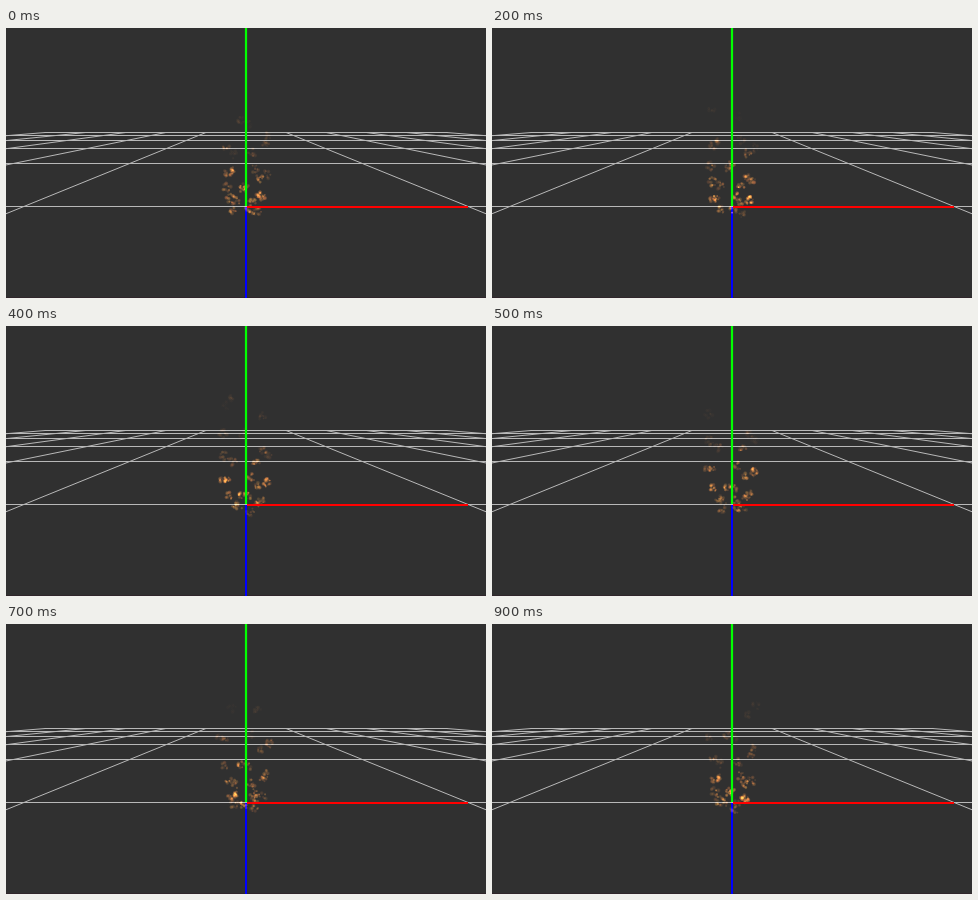
An HTML page with a canvas for the animation above (1 s loop, 480 by 270 pixels).

```html
<!DOCTYPE html>
<html lang="en">
<head>
<meta charset="utf-8">
<title>Fire particles</title>
<style>
html, body { margin: 0; width: 100%; height: 100%; overflow: hidden; background: #303030; }
canvas { display: block; width: 480px; height: 270px; }
</style>
</head>
<body>
<canvas id="stage" width="480" height="270"></canvas>
<script>
const ctx = document.getElementById('stage').getContext('2d');
const W = 480, H = 270, CX = 240;
const LOOP = 1, STEP = 0.1;
const HORIZON = 88.2, SPREAD = 2.46;
const COUNT = 27, FLOOR = 210;

function random(seed) {
  return () => {
    seed = (seed + 0x6D2B79F5) | 0;
    let n = Math.imul(seed ^ (seed >>> 15), 1 | seed);
    n = (n + Math.imul(n ^ (n >>> 7), 61 | n)) ^ n;
    return ((n ^ (n >>> 14)) >>> 0) / 4294967296;
  };
}

const rnd = random(11);
const between = (a, b) => a + (b - a) * rnd();

// Particles leave a ring in turn; its near side starts lower on the stage.
const particles = Array.from({ length: COUNT }, (_, i) => {
  const angle = i * 2.4;
  return {
    birth: i / COUNT * LOOP,
    side: Math.cos(angle) * between(22, 31),
    base: 26.5 + Math.sin(angle) * 4,
    life: between(0.78, 1),
    spin: between(-2.5, 2.5),
    glow: between(0.3, 0.6),
    puffs: Array.from({ length: 9 }, () => ({
      angle: between(0, Math.PI * 2),
      dist: 4.3 * Math.sqrt(rnd()),
      size: between(1.2, 2.6),
      heat: rnd()
    }))
  };
});

const rise = (base, age) => FLOOR - base * Math.exp(1.75 * age);
const drift = age => 1 - 0.62 * Math.exp(-2.8 * age);

function rect(color, x, y, w, h) {
  ctx.fillStyle = color;
  ctx.fillRect(x, y, w, h);
}

function line(x1, y1, x2, y2) {
  ctx.beginPath();
  ctx.moveTo(x1, y1);
  ctx.lineTo(x2, y2);
  ctx.stroke();
}

function drawGrid() {
  ctx.strokeStyle = '#b8b8b8';
  ctx.lineWidth = 1;
  for (let row = 0; row < 6; row++) {
    const depth = 1 / (0.01107 + 0.01 * row);
    const half = Math.min(CX, 5 * SPREAD * depth);
    const y = Math.floor(HORIZON + depth) + 0.5;
    line(CX - half, y, CX + half, y);
  }
  for (let col = 1; col <= 5; col++) {
    const top = 40 * col;
    const yAt = dx => HORIZON + dx / (SPREAD * col);
    for (const dir of [-1, 1]) {
      line(CX + dir * top, yAt(top), CX + dir * CX, yAt(CX));
    }
  }
}

function drawPuff(x, y, r, heat, alpha) {
  const tone = `${200 + 45 * heat | 0},${88 + 72 * heat | 0},${28 + 12 * heat | 0}`;
  const g = ctx.createRadialGradient(x, y, 0, x, y, r);
  g.addColorStop(0, `rgba(${tone},${alpha})`);
  g.addColorStop(0.5, `rgba(${tone},${alpha * 0.65})`);
  g.addColorStop(1, `rgba(${tone},0)`);
  rect(g, x - r, y - r, r * 2, r * 2);
}

function drawParticle(p, time) {
  const age = (time - p.birth + LOOP) % LOOP;
  if (age > p.life) return;
  const x = CX + p.side * drift(age), y = rise(p.base, age);
  const k = age / p.life;
  const fade = Math.min(1, 0.4 + age * 5, (1 - k) * 1.8);
  for (const f of p.puffs) {
    const a = f.angle + p.spin * age;
    const flicker = 0.7 + 0.3 * Math.sin(age * 19 + f.angle * 3);
    drawPuff(x + Math.cos(a) * f.dist, y + Math.sin(a) * f.dist, f.size,
      f.heat * (1 - 0.5 * k), p.glow * fade * flicker);
  }
}

function draw(time) {
  rect('#303030', 0, 0, W, H);
  rect('#30262b', 0, H - 1, W, 1);
  drawGrid();
  rect('#0000ff', 239, 179, 2, 91);
  ctx.globalCompositeOperation = 'lighter';
  particles.forEach(p => drawParticle(p, time));
  ctx.globalCompositeOperation = 'source-over';
  rect('#ff0000', 241, 178, 221, 2);
  rect('rgba(0,255,0,0.1)', 238, 0, 4, 178);
  rect('#00ff00', 239, 0, 2, 178);
}

let shown = -1;
const start = performance.now();
function tick() {
  const elapsed = Math.max(0, performance.now() - start) / 1000;
  const step = Math.floor((elapsed % LOOP) / STEP);
  if (step !== shown) {
    shown = step;
    draw(step * STEP);
  }
  requestAnimationFrame(tick);
}
tick();
</script>
</body>
</html>
```
